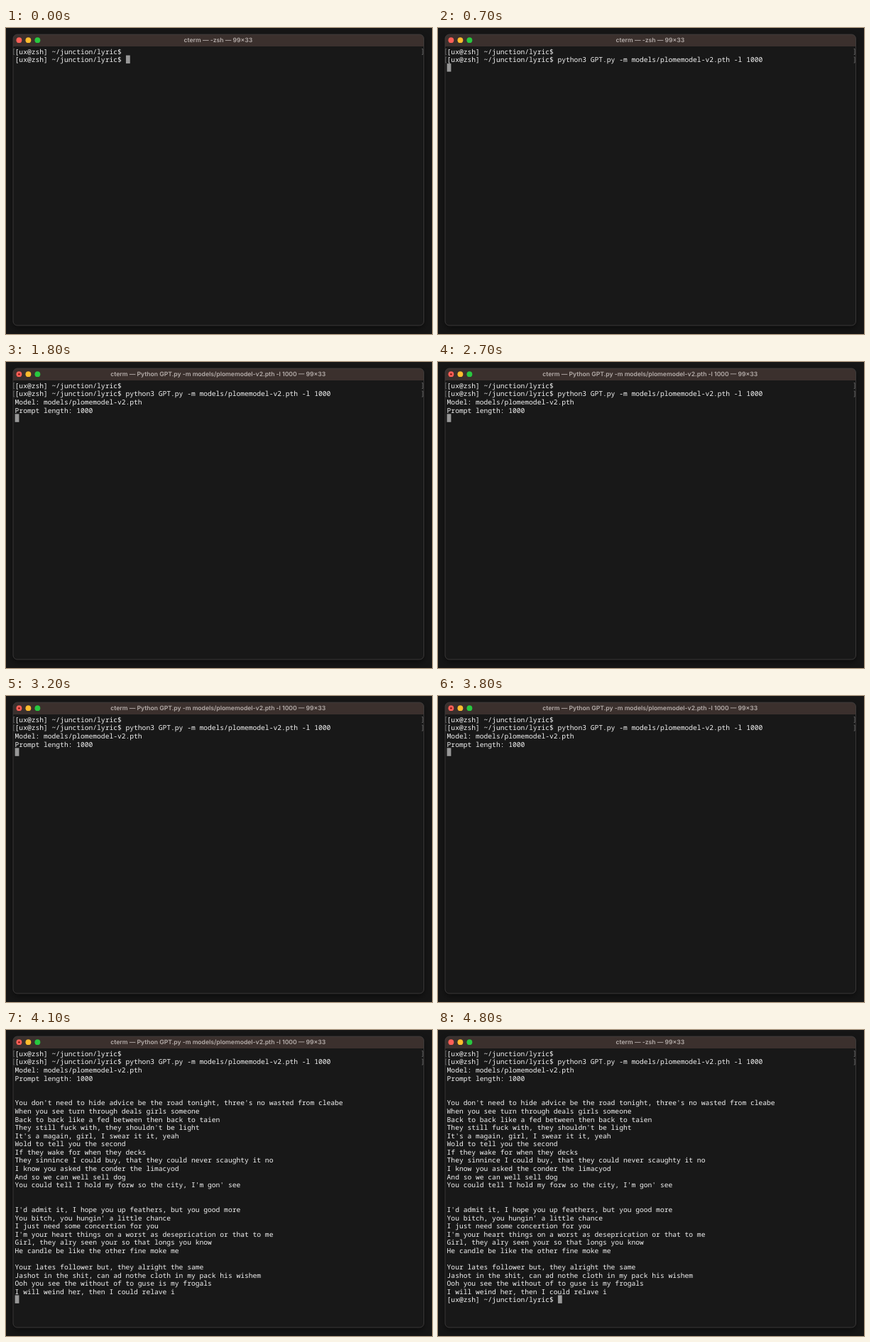
These frames come from a looping animation (600 by 432 pixels, 4900 ms). An HTML page:

```html
<!DOCTYPE html>
<html lang="en">
<head>
<meta charset="utf-8">
<title>Terminal</title>
<style>
  html, body { margin: 0; width: 100%; height: 100%; overflow: hidden; background: #161616; }
  svg { display: block; width: 600px; height: 432px; }
  text { text-rendering: geometricPrecision; white-space: pre; }
  .window { fill: #181818; filter: drop-shadow(0 4px 5px #0007); }
  .edge { fill: none; stroke: #434140; stroke-width: .8; }
  #title { font: 600 8.6px Inter, sans-serif; fill: #b5adaa; text-anchor: middle; }
  #lines { font: 500 9.65px "Noto Sans Mono", "DejaVu Sans Mono", monospace; fill: #f4f4f4; }
  .mark { fill: none; stroke: #777; stroke-width: .8; }
  #cursor { fill: #989898; }
</style>
</head>
<body>
<svg viewBox="0 0 600 432">
  <rect class="window" x="10" y="9" width="578.5" height="411" rx="6"/>
  <path d="M10 26V15a6 6 0 0 1 6-6H582.5a6 6 0 0 1 6 6V26Z" fill="#3b302d"/>
  <rect class="edge" x="10" y="9" width="578.5" height="411" rx="6"/>
  <circle cx="18.4" cy="17.2" r="3.9" fill="#ff5f57"/>
  <circle id="busy" cx="18.4" cy="17.2" r="1.3" fill="#7d1710"/>
  <circle cx="31.4" cy="17.2" r="3.9" fill="#febc2e"/>
  <circle cx="44.4" cy="17.2" r="3.9" fill="#28c840"/>
  <text id="title" x="298.8" y="20.2"></text>
  <rect id="cursor" width="5.8" height="11.5"/>
  <g id="lines"></g>
</svg>
<script>
const LOOP = 4900, LEFT = 12.6, TOP = 27, CHAR = 5.79, LINE = 11.58;
const RECALL = 100, ENTER = 700, START = 1100, INFO = 1600, LYRICS = 3900, DONE = 4400;

const prompt = "[ux@zsh] ~/junction/lyric$ ";
const model = "models/plomemodel-v2.pth";
const args = `GPT.py -m ${model} -l 1000`;
const command = `python3 ${args}`;
const lyrics = `

You don't need to hide advice be the road tonight, three's no wasted from cleabe
When you see turn through deals girls someone
Back to back like a fed between then back to taien
They still fuck with, they shouldn't be light
It's a magain, girl, I swear it it, yeah
Wold to tell you the second
If they wake for when they decks
They sinnince I could buy, that they could never scaughty it no
I know you asked the conder the limacyod
And so we can well sell dog
You could tell I hold my forw so the city, I'm gon' see


I'd admit it, I hope you up feathers, but you good more
You bitch, you hungin' a little chance
I just need some concertion for you
I'm your heart things on a worst as deseprication or that to me
Girl, they alry seen your so that longs you know
He candle be like the other fine moke me

Your lates follower but, they alright the same
Jashot in the shit, can ad nothe cloth in my pack his wishem
Ooh you see the without of to guse is my frogals
I will weind her, then I could relave i`.split("\n");

const $ = id => document.getElementById(id);

function add(tag, attrs, text = "") {
  const el = document.createElementNS("http://www.w3.org/2000/svg", tag);
  for (const name in attrs) el.setAttribute(name, attrs[name]);
  el.textContent = text;
  $("lines").append(el);
}

// Everything on screen at time t; the cursor follows the last row.
function screenRows(t) {
  const rows = [prompt, prompt + (t >= RECALL ? command : "")];
  if (t >= INFO) rows.push(`Model: ${model}`, "Prompt length: 1000");
  if (t >= LYRICS) rows.push(...lyrics);
  if (t >= ENTER) rows.push(t >= DONE ? prompt : "");
  return rows;
}

function draw(t) {
  const rows = screenRows(t), last = rows.length - 1;
  const running = t >= START && t < DONE;
  $("lines").replaceChildren();
  rows.forEach((row, i) => add("text", { x: LEFT, y: TOP + i * LINE + 9.9 }, row));
  for (let i = 0; i < (t >= ENTER ? 2 : 1); i++) {
    const y = TOP + i * LINE + 2.5;
    add("path", { class: "mark", d: `M12 ${y}h-1.2v8h1.2M585.8 ${y}h1.2v8h-1.2` });
  }
  $("cursor").setAttribute("x", LEFT + rows[last].length * CHAR);
  $("cursor").setAttribute("y", TOP + last * LINE);
  $("title").textContent = `cterm — ${running ? "Python " + args : "-zsh"} — 99×33`;
  $("busy").style.display = running ? "" : "none";
}

let shown = "";
function tick() {
  const t = performance.now() % LOOP;
  const stage = [RECALL, ENTER, START, INFO, LYRICS, DONE].filter(at => t >= at).length;
  if (stage !== shown) draw(t);
  shown = stage;
  requestAnimationFrame(tick);
}
tick();
</script>
</body>
</html>
```
